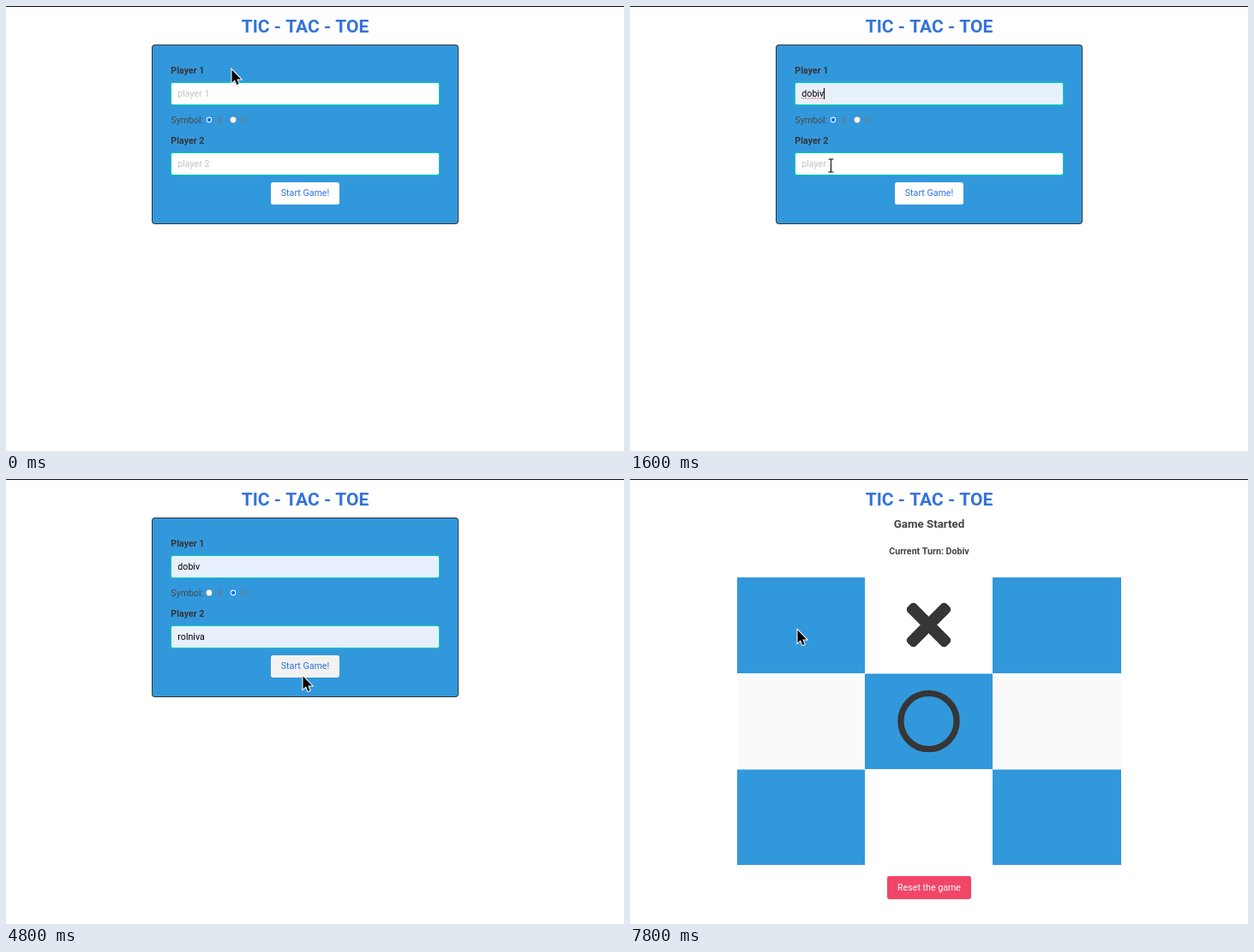
An HTML page with a canvas for the animation above (8 s loop, 721x520 px).

```html
<!DOCTYPE html>
<html lang="en">
<head>
<meta charset="utf-8">
<title>Tic - Tac - Toe</title>
<style>
  html, body { margin: 0; width: 100%; height: 100%; overflow: hidden; background: #fff; }
  canvas { display: block; }
</style>
</head>
<body>
<canvas id="stage" width="721" height="520"></canvas>
<script>
const ctx = document.getElementById('stage').getContext('2d');
const LOOP = 8000, STEP = 100;
const SWITCH_SYMBOL = 3500, GAME_START = 5000, RING_PLAYED = 6100, CROSS_PLAYED = 7200;
const BLUE = '#3298dc', LINK = '#3273dc', DARK = '#363636', TEXT = '#4a4a4a';
const CENTER = 349, LEFT = 192, FIELD_WIDTH = 314, FIELD_HEIGHT = 27;

// Straight pointer moves; the pointer rests between them.
const HOME = { x: 263, y: 74 };
const MOVES = [
  { from: 0, to: 1100, x: 254, y: 132 },
  { from: 1200, to: 1600, x: 234, y: 186 },
  { from: 1700, to: 2100, x: 232, y: 202 },
  { from: 2300, to: 2400, x: 230, y: 220 },
  { from: 2800, to: 3100, x: 264, y: 133 },
  { from: 3700, to: 4200, x: 346, y: 237 },
  { from: 4700, to: 4800, x: 346, y: 230 },
  { from: 5300, to: 5600, x: 327, y: 280 },
  { from: 6300, to: 6700, x: 302, y: 177 },
  { from: 7500, to: 7800, x: 195, y: 176 }
];

const PLAYERS = [
  { name: 'dobiv', focus: 600, pick: 1100, blur: 1800 },
  { name: 'rolniva', focus: 1800, pick: 2800, blur: SWITCH_SYMBOL }
].map((player, i) => ({ ...player, number: i + 1, top: 89 + 82 * i }));

function pointerAt(t) {
  let { x, y } = HOME;
  for (const move of MOVES) {
    const k = Math.min(1, Math.max(0, (t - move.from) / (move.to - move.from)));
    x += (move.x - x) * k;
    y += (move.y - y) * k;
  }
  return { x: Math.round(x), y: Math.round(y) };
}

function box(x, y, w, h, fill, radius = 0) {
  ctx.fillStyle = fill;
  ctx.beginPath();
  ctx.roundRect(x, y, w, h, radius);
  ctx.fill();
}

function borderedBox(x, y, w, h, fill, border, radius) {
  box(x, y, w, h, border, radius);
  box(x + 1, y + 1, w - 2, h - 2, fill, radius - 1);
}

function write(str, x, y, { size = 32 / 3, weight = 400, color = DARK, align = 'left', family = 'Roboto' } = {}) {
  ctx.font = `${weight} ${size}px ${family}, sans-serif`;
  ctx.fillStyle = color;
  ctx.textAlign = align;
  ctx.fillText(str, x, y);
  return ctx.measureText(str).width;
}

const writeCentered = (str, y, style) => write(str, CENTER, y, { align: 'center', ...style });

function disc(x, y, r, color) {
  ctx.fillStyle = color;
  ctx.beginPath();
  ctx.arc(x, y, r, 0, 2 * Math.PI);
  ctx.fill();
}

function radio(x, checked, label) {
  disc(x, 133, 4, checked ? '#0075ff' : '#767676');
  disc(x, 133, 3.4, '#fff');
  if (checked) disc(x, 133, 2.3, '#0075ff');
  write(label, x + 9, 137, { color: '#777' });
}

const isOpen = (p, t) => t >= p.focus && t < p.pick;
const overRow = (p, { y }) => y >= p.top + 36 && y < p.top + 72;

function drawField(p, t, pointer) {
  const { top, name } = p;
  const focused = t >= p.focus && t < p.blur;
  const filled = t >= p.pick;
  const preview = isOpen(p, t) && overRow(p, pointer);
  const textX = LEFT + 8.3, baseline = top + 17;

  write('Player ' + p.number, LEFT + 0.3, top - 10, { weight: 700 });
  if (focused) box(LEFT - 1, top - 1, FIELD_WIDTH + 2, FIELD_HEIGHT + 2, 'rgba(0,209,178,.25)', 4);
  borderedBox(LEFT, top, FIELD_WIDTH, FIELD_HEIGHT, filled || preview ? '#e8f0fe' : '#fff', '#00d1b2', 2.7);

  let width = 0;
  if (filled) width = write(name, textX, baseline, { color: '#000' });
  else if (preview) write(name, textX, baseline, { size: 9, color: '#000' });
  else write('player ' + p.number, textX, baseline, { color: '#c3c3c3' });

  if (!focused) return;
  for (let dx = 0; dx < width; dx += 2) box(200 + dx, baseline + 1 + dx / 2 % 2 * 0.6, 1, 1, '#e03030');
  box(Math.round(200 + width), top + 7, 1, 13, '#000');
}

function drawSuggestion(p, pointer) {
  const top = p.top + 28, active = overRow(p, pointer);
  ctx.save();
  ctx.shadowColor = 'rgba(0,0,0,.35)';
  ctx.shadowBlur = 3;
  ctx.shadowOffsetY = 1;
  box(LEFT, top, FIELD_WIDTH, 52, '#2f2f2f', 3);
  ctx.restore();
  if (active) box(LEFT, top + 8, FIELD_WIDTH, 36, '#15539e');
  write(p.name, LEFT + 12, top + 31, { size: 14.2, color: active ? '#fff' : '#eee', family: '"DejaVu Sans"' });
}

function drawForm(t, pointer) {
  borderedBox(170, 45, 358, 210, BLUE, DARK, 4);
  PLAYERS.forEach(p => drawField(p, t, pointer));

  write('Symbol:', LEFT + 0.3, 137, { color: TEXT });
  radio(237, t < SWITCH_SYMBOL, 'X');
  radio(265, t >= SWITCH_SYMBOL, 'O');

  const hover = Math.abs(pointer.x - CENTER) < 40 && pointer.y >= 206 && pointer.y < 232;
  box(CENTER - 40, 206, 80, 26, hover ? '#f2f2f2' : '#fff', 2.7);
  writeCentered('Start Game!', 222, { color: LINK });

  PLAYERS.filter(p => isOpen(p, t)).forEach(p => drawSuggestion(p, pointer));
}

function drawCross(x, y) {
  for (const turn of [1, -1]) {
    ctx.save();
    ctx.translate(x, y);
    ctx.rotate(turn * Math.PI / 4);
    box(-32.2, -6.9, 64.4, 13.8, DARK, 4.6);
    ctx.restore();
  }
}

function drawRing(x, y) {
  ctx.strokeStyle = DARK;
  ctx.lineWidth = 7.3;
  ctx.beginPath();
  ctx.arc(x, y, 32.6, 0, 2 * Math.PI);
  ctx.stroke();
}

function drawBoard() {
  const columnX = c => Math.floor(125 + 149.4 * c);
  const rowY = r => 115 + 112 * r;
  for (let r = 0; r < 3; r++) {
    const gap = r ? 0.6 : 0;
    for (let c = 0; c < 3; c++) {
      const color = (r + c) % 2 === 0 ? BLUE : r === 1 ? '#fafafa' : '#fff';
      box(columnX(c), rowY(r) + gap, columnX(c + 1) - columnX(c), 112 - gap, color);
    }
  }
}

function drawGame(t) {
  const secondTurn = t >= RING_PLAYED && t < CROSS_PLAYED;
  const { name } = PLAYERS[secondTurn ? 1 : 0];
  writeCentered('Game Started', 57, { size: 40 / 3, weight: 700, color: '#444' });
  writeCentered('Current Turn: ' + name[0].toUpperCase() + name.slice(1), 88, { weight: 700, color: '#444' });

  drawBoard();
  if (t >= RING_PLAYED) drawRing(348.5, 283);
  if (t >= CROSS_PLAYED) drawCross(348.5, 170.5);

  box(CENTER - 49, 464, 98, 27, '#f14668', 2.7);
  writeCentered('Reset the game', 481, { color: '#fff' });
}

const ARROW = new Path2D('M0 0V15L3.4 11.8 5.8 17.5 8.2 16.5 5.8 11H10.6Z');
const I_BEAM = new Path2D('M-3-7.5H3M0-7.5V7.5M-3 7.5H3');

function drawPointer({ x, y }, textCursor) {
  const shape = textCursor ? I_BEAM : ARROW;
  ctx.save();
  ctx.translate(x + 0.5, y + 0.5);
  ctx.strokeStyle = '#fff';
  ctx.lineWidth = textCursor ? 3 : 2;
  ctx.stroke(shape);
  ctx.fillStyle = ctx.strokeStyle = '#000';
  ctx.lineWidth = 1;
  if (textCursor) ctx.stroke(shape);
  else ctx.fill(shape);
  ctx.restore();
}

function draw(now) {
  const t = Math.floor(now % LOOP / STEP) * STEP;
  const pointer = pointerAt(t);
  const inForm = t < GAME_START;
  box(0, 0, 721, 520, '#fff');
  box(0, 0, 721, 1, '#111');
  writeCentered('TIC - TAC - TOE', 31, { size: 21, weight: 700, color: LINK });
  if (inForm) drawForm(t, pointer);
  else drawGame(t);

  const covered = PLAYERS.some(p => isOpen(p, t) && pointer.y >= p.top + 28);
  const overField = PLAYERS.some(p => pointer.y >= p.top && pointer.y < p.top + FIELD_HEIGHT);
  drawPointer(pointer, inForm && overField && !covered);
}

const start = performance.now();
(function frame() {
  draw(performance.now() - start);
  requestAnimationFrame(frame);
})();
</script>
</body>
</html>
```
